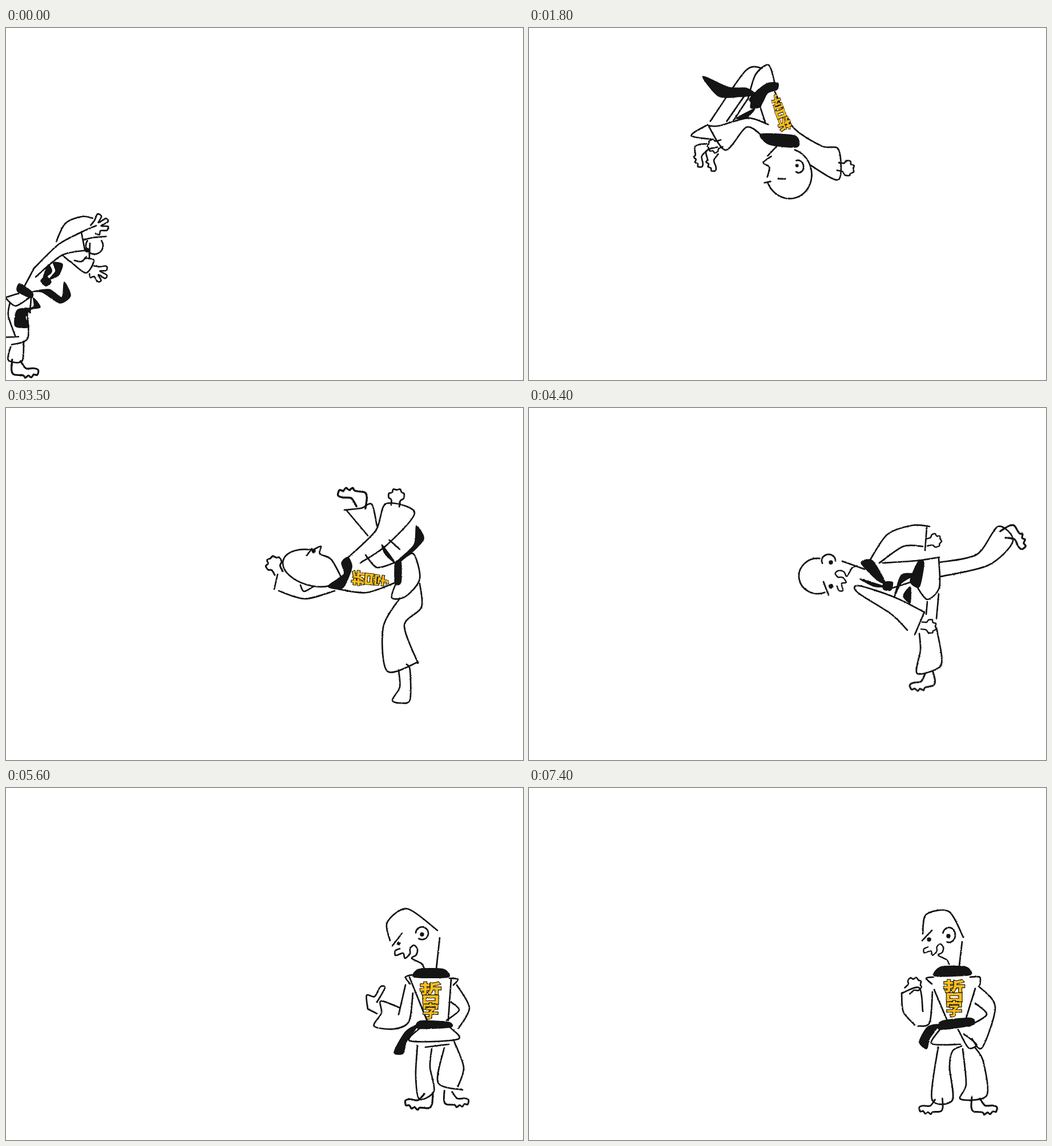
An HTML page that plays this animation: 906x618 px, repeating every 7500 ms.

```html
<!DOCTYPE html>
<html lang="en">
<head>
<meta charset="utf-8">
<title>Karate jump</title>
<style>
html, body { margin: 0; width: 100%; height: 100%; overflow: hidden; background: #fff; }
svg { display: block; width: 100vw; height: 100vh; }
.line { fill: none; stroke: #111; stroke-width: 2.7; stroke-linecap: round; stroke-linejoin: round; }
.ink { fill: #151515; stroke: #111; stroke-width: 1.5; stroke-linejoin: round; }
text { font-family: "Noto Sans CJK JP", "Noto Sans CJK", sans-serif; font-weight: 700; text-anchor: middle; fill: #fcbf1b; stroke: #1c1708; stroke-width: 2.4; paint-order: stroke; }
</style>
</head>
<body>
<svg viewBox="0 0 906 618">
  <filter id="pencil" filterUnits="userSpaceOnUse" x="0" y="0" width="906" height="618" color-interpolation-filters="sRGB">
    <feTurbulence type="fractalNoise" baseFrequency=".45" numOctaves="2" seed="4"/>
    <feDisplacementMap in="SourceGraphic" scale="2.2" xChannelSelector="R" yChannelSelector="G"/>
  </filter>
  <g id="figure" filter="url(#pencil)"></g>
</svg>
<script>
const LOOP = 7500, STEP = 100;
const figure = document.getElementById('figure');
let layer;

function add(parent, tag, attrs) {
  const node = document.createElementNS('http://www.w3.org/2000/svg', tag);
  for (const key in attrs) node.setAttribute(key, attrs[key]);
  return parent.appendChild(node);
}

// Catmull-Rom spline through a few points.
function spline(text, closed) {
  const p = text.split(' ').map(pair => pair.split(',').map(Number));
  const n = p.length, bend = closed ? 0.13 : 0.15;
  const at = i => closed ? p[(i + n) % n] : p[Math.max(0, Math.min(n - 1, i))];
  let d = 'M' + p[0];
  for (let i = 0; i < (closed ? n : n - 1); i++) {
    const [a, b, c, e] = [at(i - 1), at(i), at(i + 1), at(i + 2)];
    d += `C${b.map((v, k) => v + (c[k] - a[k]) * bend)} ${c.map((v, k) => v - (e[k] - b[k]) * bend)} ${c}`;
  }
  return closed ? d + 'Z' : d;
}

const trace = (strokes, closed) => strokes.split('|').map(s => spline(s, closed)).join('');
const line = strokes => add(layer, 'path', { class: 'line', d: trace(strokes, false) });
const ink = shapes => add(layer, 'path', { class: 'ink', d: trace(shapes, true) });
const dot = (cx, cy, r = 3.7) => add(layer, 'circle', { cx, cy, r, fill: '#111' });

function arc(x, y, rx, ry, from, to, tilt = 0) {
  const end = a => [rx * Math.cos(a * Math.PI / 180), ry * Math.sin(a * Math.PI / 180)];
  const large = to - from > 180 ? 1 : 0;
  add(layer, 'path', { class: 'line', d: `M${end(from)}A${rx} ${ry} 0 ${large} 1 ${end(to)}`, transform: `translate(${x} ${y}) rotate(${tilt})` });
}

// Reusable parts, drawn from the wrist, ankle or nose.
const stamp = shape => (x, y, turn = 0, size = 1, side = 1) => line(shape).setAttribute('transform',
  `translate(${x} ${y}) rotate(${turn}) scale(${size * side} ${size})`);
const fist = stamp('0,-7 9,-8 12,-13 19,-14 21,-9 27,-8 27,-2 29,3 24,7 23,11 15,12 10,7 0,7');
const palm = stamp('0,-9 10,-13 20,-20 24,-13 14,-6 29,-6 29,1 15,1 25,8 20,13 10,8 5,13 0,8');
const foot = stamp('-6,-12 -8,3 -5,10 8,12 11,16 16,13 20,16 24,12 29,13 31,6 25,3 13,2 6,-9');
const face = stamp('0,0 -8,4 -7,12 6,8 9,17 18,9 18,0 25,-6 31,1 29,11 21,17 38,26 43,35');

function lettering(x, y, turn, width = 1) {
  const g = add(layer, 'g', { transform: `translate(${x} ${y}) rotate(${turn}) scale(${width} 1)` });
  add(g, 'text', { y: 0, 'font-size': 40 }).textContent = '哲';
  add(g, 'text', { y: 28, 'font-size': 29 }).textContent = '字';
}

function reach() {
  arc(155, 382, 15, 15, -35, 215);
  dot(142, 390, 4);
  line('88,375 104,343 133,331 152,334|147,378 146,404|141,402 132,410 120,408|100,400 112,410');
  line('48,423 92,380 133,358 158,347|52,437 98,399 143,390|132,358 138,389|175,366 152,368 136,372|113,410 140,430 154,408 138,404');
  line('33,452 48,424|-4,474 22,466|-4,470 16,488 40,474|7,482 4,505 16,540|44,474 42,500|37,500 38,545 10,556|-2,543 22,542|8,560 4,583 28,585 31,550');
  palm(153, 354, -30);
  palm(150, 425, 30, 0.95);
  foot(19, 596, -4, 1.2);
  ink('74,416 80,428 65,440|83,412 99,415 92,434 76,441 87,427|61,444 70,436 79,446 70,453|24,449 46,464 44,474 20,462');
  ink('46,463 76,459 98,473 102,446 113,470 94,483 64,464|48,474 60,490 44,494 34,508 40,525 16,523 20,495 48,490');
}

function bow() {
  arc(515, 279, 41, 39, 184, 408);
  arc(493, 273, 10, 9, 140, 340);
  dot(516, 286);
  dot(523, 313, 3);
  line('473,276 462,292 442,301|483,317 470,320 452,334|521,278 522,292|487,316 480,303 487,303 489,315 496,318|499,318 505,323 510,316|528,308 529,319');
  line('285,256 344,250 398,268 434,303|298,257 300,296 318,297 358,276 396,285 416,310|554,290 593,281 575,324 533,318');
  line('382,320 412,303|396,349 424,346|362,349 343,337 347,351 370,361|370,362 404,382 404,370');
  line('345,353 320,380 318,430 318,474 356,464|355,369 338,405 356,468|388,374 380,430 378,486 345,468|358,428 352,462');
  fist(302, 275, 180, 0.95);
  fist(584, 306, 0, 1.2);
  foot(335, 494, 0, 1.05, -1);
  foot(362, 494, 20);
  ink('434,293 443,293 440,316 429,326|452,311 460,313 441,336 435,335|412,330 424,328 432,338 422,347|365,325 377,320 404,352 400,365 374,345|400,360 408,364 401,374');
  ink('372,363 366,378 377,405 368,430 340,427 360,412 362,390 348,408 358,372');
}

function flip() {
  arc(560, 232, 44, 40, 208, 438);
  arc(551, 213, 11, 9, 170, 400);
  dot(549, 215, 3);
  line('568,240 565,252|567,266 567,277|558,270 542,263 532,272 524,256|505,238 522,262');
  line('414,227 480,209 524,166 536,138 588,149 553,192|468,250 450,282 453,335 449,352|486,264 465,288 497,332 449,353');
  line('400,224 366,228 378,254 418,276|430,258 466,254|369,240 368,270 442,348|418,277 449,308|409,279 448,320|447,354 460,386 474,350');
  fist(565, 145, -65);
  fist(484, 336, 85, 0.9);
  foot(486, 374, -3);
  foot(497, 356, -10);
  ink('497,208 517,208 503,255 482,266|400,219 411,222 414,240 434,258 418,273 398,240|412,264 434,256 433,274');
  ink('412,262 410,290 402,325 362,345 390,305 398,274|436,267 449,285 446,302');
  lettering(450, 225, 82, 0.62);
}

function kick() {
  arc(538, 281, 54, 31, 10, 258, 14);
  dot(539, 251);
  line('590,302 570,266 550,256 552,243 540,248|527,259 536,247|516,311 522,322 538,314');
  line('476,292 470,318|478,321 524,335 576,321|600,262 648,215 666,168 716,184 668,240 621,272');
  line('582,318 632,324 686,305|692,268 714,256 725,300 700,331 676,333 684,306|593,179 622,176 641,169 650,207|597,180 634,224|672,232 690,248|630,258 650,280 680,272');
  line('725,308 728,350 698,382 722,448|690,334 661,385 668,462 722,446|688,460 690,490 677,513 692,518 708,512 708,460 702,450');
  fist(478, 290, -115, 1.1);
  fist(682, 172, -80, 1.05);
  foot(622, 161, 180, 1.3);
  ink('599,262 606,280 590,316 564,313 592,292 588,272|659,240 683,273 664,256|719,207 732,230 706,258 682,272 715,240|682,272 692,270 692,306 682,308');
  lettering(640, 301, -84, 0.72);
}

function balance() {
  arc(506, 295, 33, 31, 68, 276);
  arc(525, 268, 12, 11, 155, 365);
  dot(529, 271);
  dot(529, 313, 4.2);
  face(540, 313, -85, 0.9);
  line('516,305 525,329|549,269 588,283|597,268 628,222 672,206 702,208|697,210 694,250|614,272 656,243 690,243|620,272 680,268 719,262|637,316 668,306');
  line('692,358 640,332 578,312 576,324 635,362 663,390|693,358 676,398|718,264 719,315 698,336 680,314|719,271 785,257 822,208 848,234 805,276 721,296');
  line('698,340 696,362|718,326 714,370|684,396 686,425 680,466 718,456 723,435 714,386');
  fist(697, 236, -10, 0.9);
  fist(688, 382, 8, 0.9);
  foot(842, 217, -114, 1.2, -1);
  foot(702, 476, -6, 1.15, -1);
  ink('582,272 602,268 624,306 610,302|580,300 622,313 604,313|622,306 637,306 634,320 621,318|682,270 692,272 684,314 668,304');
  ink('676,292 652,308 640,333 652,294|668,314 668,342 656,330');
}

function thumbUp() {
  arc(729, 255, 11, 11, 185, 480);
  dot(729, 257);
  dot(688, 273, 3);
  face(690, 282);
  line('673,268 668,236 703,212 756,250|760,263 754,318|677,277 694,255|711,328 700,332 708,344|700,346 688,398|713,360 706,410 680,423 645,418 658,395 657,374 690,386');
  line('634,388 632,364 646,366 656,349 664,351 650,376|634,388 650,396|777,334 792,336 784,346|790,346 812,386 793,422|780,376 794,390 772,408');
  line('707,332 738,409|780,336 775,408|727,420 708,444 792,441 778,420|721,452 718,505 724,546 750,532 743,490 746,458|735,455 776,450|768,456 757,517 800,530|784,442 802,490 792,524');
  foot(738, 549, 12, 1.2, -1);
  foot(776, 544, -5, 1.1);
  ink('724,318 766,318 775,332 715,332|726,409 775,411 779,420 722,422|722,416 702,445 696,466 680,464 700,428');
  lettering(744, 375, 0);
}

function proud() {
  arc(736, 258, 11, 13, 195, 470);
  dot(735, 260);
  dot(701, 266);
  face(699, 279, 0, 0.87);
  line('690,256 696,222 736,217 761,262|759,270 754,312|689,268 706,250|709,332 696,334 706,344|773,332 790,332 790,346|707,358 702,412 682,418');
  line('653,360 656,393 676,416|654,360 684,351 690,392|788,348 817,384 794,456 776,440|782,378 802,398 770,418|710,354 732,406|782,352 766,404');
  line('720,424 706,449 756,450|752,424 770,456 784,450 762,432|717,455 706,546 742,548 737,490 742,462 758,453|760,458 766,520 756,546 802,540 796,480 782,456');
  fist(663, 356, -40);
  foot(717, 557, 5, 1.05, -1);
  foot(784, 556, -4, 1.15);
  ink('722,314 765,314 773,328 711,330|724,409 774,404 777,416 720,424|718,416 702,440 697,458 684,446 698,420');
  lettering(745, 371, 0);
}

function scene(paint, x, y, moves) {
  layer = add(figure, 'g', { display: 'none' });
  paint();
  return { group: layer, pivot: `${x} ${y}`, moves };
}

// Each move is [ms, dx, dy, degrees].
const scenes = [
  scene(reach, 85, 470, [[0, 0, 0, 0], [400, 125, -95, 8], [800, 230, 0, 0]]),
  scene(bow, 440, 380, [[900, -30, 50, -4], [1100, 0, 0, 0], [1400, -20, 85, 0], [1600, -10, -172, 0]]),
  scene(flip, 483, 255, [[1700, -75, -70, -330], [2300, -20, -70, -40], [2500, 0, 0, 0], [2900, 60, 200, 10]]),
  scene(kick, 600, 330, [[3000, -15, 55, 0], [3500, 0, 0, 0], [4200, 65, 0, 6]]),
  scene(balance, 690, 350, [[4300, 0, -10, -2], [4400, 0, 0, 0], [4600, 0, 14, 2]]),
  scene(thumbUp, 740, 450, [[4700, -60, 4, 0], [5600, 0, 0, 0], [6000, 8, 2, 0]]),
  scene(proud, 740, 450, [[6100, 2, 3, 0], [6700, -4, 3, 0], [7400, 0, 0, 0]])
];

function placeAt(moves, time) {
  const next = moves.findIndex(move => move[0] > time);
  if (next < 0) return moves[moves.length - 1];
  const from = moves[next - 1], to = moves[next];
  const u = (time - from[0]) / (to[0] - from[0]);
  return from.map((v, i) => v + (to[i] - v) * u);
}

function draw(time) {
  const t = Math.floor(time % LOOP / STEP) * STEP;
  const current = scenes.filter(s => s.moves[0][0] <= t).pop();
  for (const s of scenes) s.group.setAttribute('display', s === current ? 'inline' : 'none');
  const [, dx, dy, turn] = placeAt(current.moves, t);
  current.group.setAttribute('transform', `translate(${dx} ${dy}) rotate(${turn} ${current.pivot})`);
}

const start = performance.now();
function tick() {
  draw(Math.max(0, performance.now() - start));
  requestAnimationFrame(tick);
}
tick();
</script>
</body>
</html>
```
